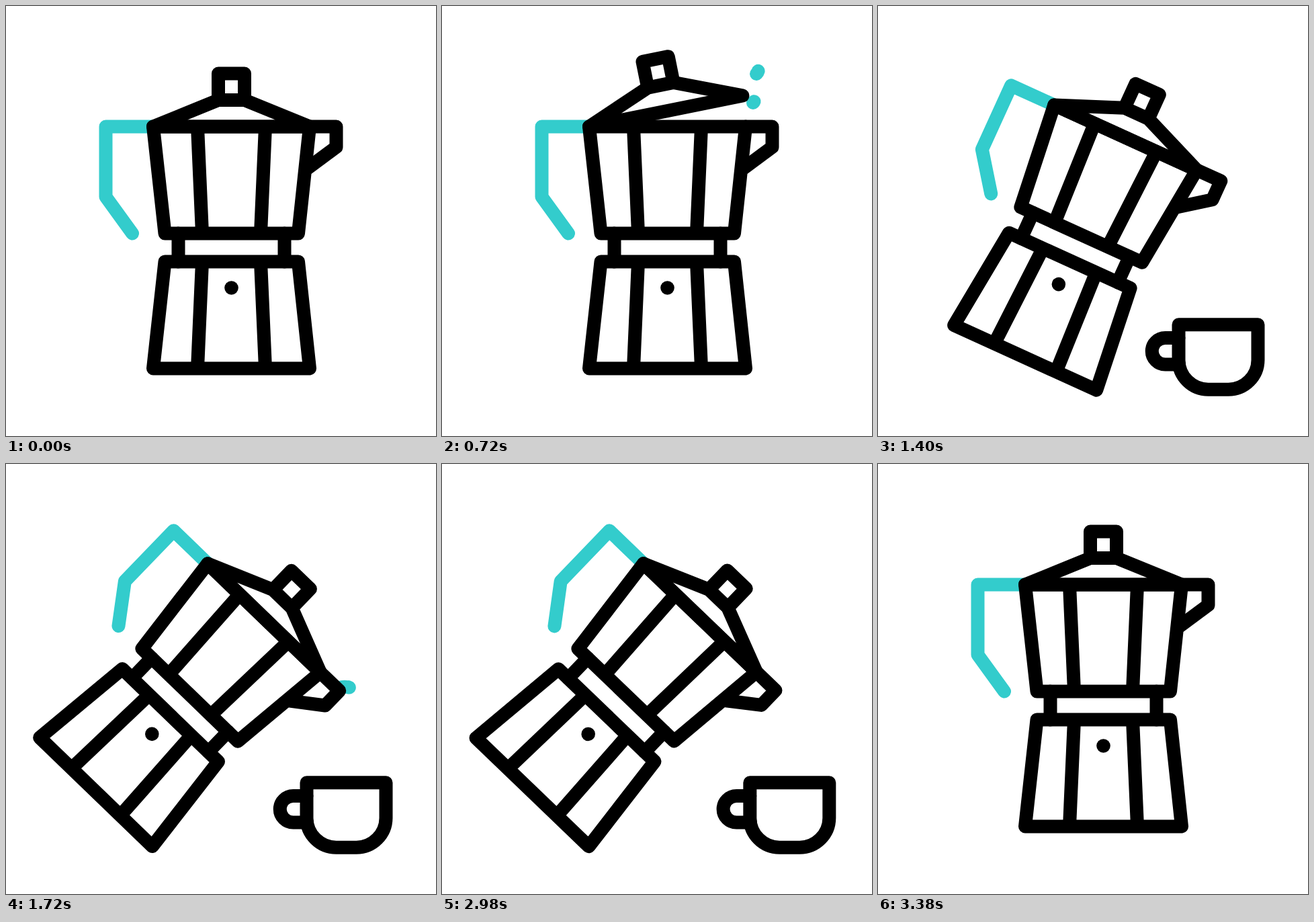
Write an HTML page that moves like this. It is 640 px wide and 640 px high and loops after 3.6 s.

```html
<!DOCTYPE html>
<html lang="en">
<head>
<meta charset="utf-8">
<title>Moka pot</title>
<style>
  html, body { margin: 0; width: 100%; height: 100%; overflow: hidden; background: #fff; }
  svg { display: block; width: 100%; height: 100%; }
  path { fill: none; stroke: #000; stroke-width: 20; stroke-linecap: round; stroke-linejoin: round; }
  .teal { stroke: #3cc; }
</style>
</head>
<body>
<svg viewBox="0 0 640 640">
  <clipPath id="aboveCup"><rect width="640" height="474"/></clipPath>

  <path id="steamLow" class="teal" pathLength="1" d="M463 144C473 134 454 128 463 116"/>
  <path id="steamHigh" class="teal" pathLength="1" d="M468 101C482 86 437 88 463 59"/>
  <g clip-path="url(#aboveCup)">
    <path id="stream" class="teal" pathLength="1"
      d="M496 333Q502 331 508 332C530 335 543.5 375 543.5 415C543.5 435 540 455 533 475"/>
  </g>

  <g id="cup">
    <path d="M447.5 474.2H565.5V527A44 44 0 0 1 521.5 570.7H491.5A44 44 0 0 1 447.5 527Z"/>
    <path d="M447.5 494H427.5A19.7 19.7 0 0 0 427.5 533.5H448"/>
  </g>

  <g id="pot">
    <path class="teal" d="M219 179.5H148.5V284L188 338.5"/>
    <path d="M219 179.5H452L435 338.5H236.5ZM285 179.5L292 338.5M386 179.5L379 338.5"/>
    <path d="M452 179.5H491.5V210L449 241.5"/>
    <path d="M256.5 338.5V380.5M414.5 338.5V380.5"/>
    <path d="M236.5 380.5H435L452 539.5H219ZM292 380.5L285 539.5M379 380.5L386 539.5"/>
    <circle cx="335.5" cy="419.5" r="10.3"/>
    <path id="lid" d="M219 179.5L316 140H355L452 179.5ZM316 140V100.5H355V140"/>
  </g>
</svg>
<script>
const LOOP = 3600;
const [steamLow, steamHigh, stream, cup, pot, lid] =
  ['steamLow', 'steamHigh', 'stream', 'cup', 'pot', 'lid'].map(id => document.getElementById(id));

// Eased progress from 0 to 1 between two times.
function ease(t, start, end) {
  const p = Math.min(1, Math.max(0, (t - start) / (end - start)));
  return p * p * (3 - 2 * p);
}

// Rises during the first interval and falls during the second.
const pulse = (t, a, b, c, d) => ease(t, a, b) - ease(t, c, d);

// Shows only the part of a line between two fractions of its length.
function trim(path, from, to) {
  path.style.display = to > from ? '' : 'none';
  path.setAttribute('stroke-dasharray', `${to - from} 2`);
  path.setAttribute('stroke-dashoffset', -from);
}

function draw(t) {
  const open = pulse(t, 100, 640, 780, 1310);
  const tilt = pulse(t, 1065, 1690, 2967, 3373);
  const inside = pulse(t, 892, 1393, 2942, 3344);

  lid.setAttribute('transform', `rotate(${-11.4 * open} 219 179.5)`);
  pot.setAttribute('transform',
    `translate(${-71 * tilt} ${-9.5 * tilt}) rotate(${44 * tilt} 322 357)`);
  cup.setAttribute('transform', `translate(${410 * (1 - inside)} 0)`);

  trim(steamLow, ease(t, 880, 1200), ease(t, 670, 980));
  trim(steamHigh, ease(t, 1000, 1360), ease(t, 660, 980));
  trim(stream, ease(t, 2500, 2880), ease(t, 1610, 2215));
}

const begin = performance.now();
function tick() {
  draw((performance.now() - begin) % LOOP);
  requestAnimationFrame(tick);
}
draw(0);
requestAnimationFrame(tick);
</script>
</body>
</html>
```
